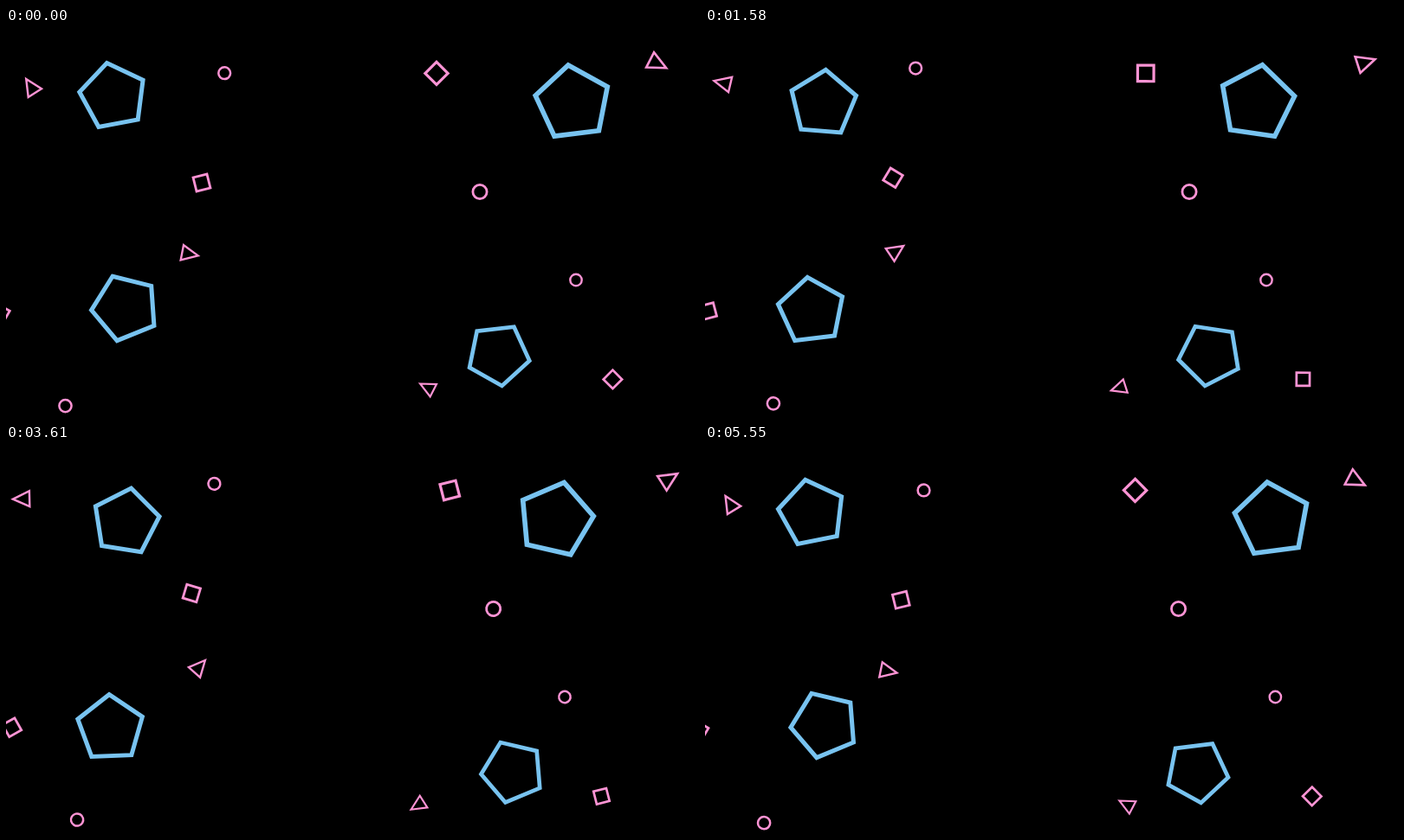
An HTML page that plays this animation: 800 by 450 pixels, repeating every 5.58 s.

```html
<!DOCTYPE html>
<html lang="en">
<head>
<meta charset="utf-8">
<title>Drifting shapes</title>
<style>
  html, body { margin: 0; width: 100%; height: 100%; overflow: hidden; background: #000; }
  svg { display: block; width: 100vw; height: 100vh; }
  svg * { fill: none; stroke-linejoin: miter; }
</style>
</head>
<body>
<svg id="stage" viewBox="0 0 800 450"></svg>
<script>
const LOOP = 5580;
const BLUE = '#78c3f0', PINK = '#ff94d5';
const stage = document.getElementById('stage');

// Smooth curve through a few values, tangents taken from local parabolas.
const KNOTS = [0, 1180, 2000, 2670, 3610, 4360, 5550];
function curve(values) {
  const last = KNOTS.length - 1;
  const gap = i => KNOTS[i + 1] - KNOTS[i];
  const slope = i => (values[i + 1] - values[i]) / gap(i);
  const tangent = KNOTS.map((_, i) => {
    if (i === 0) return slope(0) + (slope(0) - slope(1)) * gap(0) / (gap(0) + gap(1));
    if (i === last) {
      return slope(i - 1) + (slope(i - 1) - slope(i - 2)) * gap(i - 1) / (gap(i - 1) + gap(i - 2));
    }
    return (slope(i - 1) * gap(i) + slope(i) * gap(i - 1)) / (gap(i - 1) + gap(i));
  });
  return time => {
    const t = Math.min(time, KNOTS[last]);
    let i = 0;
    while (i < last - 1 && t > KNOTS[i + 1]) i++;
    const h = gap(i), u = (t - KNOTS[i]) / h, v = 1 - u;
    return v * v * ((1 + 2 * u) * values[i] + u * h * tangent[i])
         + u * u * ((1 + 2 * v) * values[i + 1] - v * h * tangent[i + 1]);
  };
}

const sway  = curve([0, .535, .835, 1, .9, .493, -.025]);
const glide = curve([0, .537, .837, 1, .803, .41, -.015]);
const spin  = curve([0, .48, .773, 1, .83, .424, -.005]);

const shapes = [];
function add(tag, attrs, color, width, from, to, angle, turn, move, rotate) {
  const node = document.createElementNS('http://www.w3.org/2000/svg', tag);
  for (const key in attrs) node.setAttribute(key, attrs[key]);
  node.setAttribute('stroke', color);
  node.setAttribute('stroke-width', width);
  stage.append(node);
  shapes.push({ node, from, to, angle, turn, move, rotate });
}

function pentagon(from, to, radius, angle) {
  const points = Array.from({ length: 5 }, (_, i) => {
    const a = i * Math.PI * 2 / 5;
    return [radius * Math.sin(a), -radius * Math.cos(a)].map(n => n.toFixed(2)).join();
  }).join(' ');
  add('polygon', { points }, BLUE, radius * .128, from, to, angle, 22, glide, sway);
}

function pink(tag, attrs, width, from, to, angle) {
  add(tag, attrs, PINK, width, from, to, angle, -71.5, sway, spin);
}
const circle = (from, to, r, width) => pink('circle', { r }, width, from, to, 0);
const square = (from, to, side, width, angle) =>
  pink('rect', { x: -side / 2, y: -side / 2, width: side, height: side }, width, from, to, angle);
const triangle = (from, to, k, angle) =>
  pink('polygon', { points: `${12.7 * k},0 ${-6.4 * k},${9 * k} ${-6.4 * k},${-9 * k}` },
    2.4 * k, from, to, angle);

pentagon([123.7, 79], [141.9, 91.2], 39.2, -10.7);
pentagon([654.4, 86.6], [629.6, 86.2], 44, -7);
pentagon([137.7, 323.6], [116.4, 328.9], 39.2, -22);
pentagon([568.4, 377.6], [589, 377.9], 36.6, 29.5);

circle([252.2, 52.2], [239.1, 44], 6.9, 2.5);
circle([547, 189.5], [564.4, 189.5], 8.1, 2.8);
circle([658, 291.5], [643.5, 291.5], 6.7, 2.4);
circle([68.5, 437.1], [83.6, 433.1], 7.1, 2.5);

square([497, 52.4], [514, 52.4], 18.6, 3.2, 45);
square([226, 179], [213, 170.7], 16.4, 2.8, -14);
square([-6.6, 330.2], [8.4, 326.4], 16, 2.8, 30);
square([700.4, 406.4], [686, 406.3], 15.2, 2.7, 45);

triangle([30, 69.7], [19.7, 61.5], 1, 238);
triangle([749.8, 40], [764.8, 40.7], 1.09, 27);
triangle([209.5, 261], [223, 258], .98, 11);
triangle([488.2, 416.7], [476, 415.5], .9, 207);

function draw(time) {
  for (const { node, from, to, angle, turn, move, rotate } of shapes) {
    const p = move(time);
    const [x, y] = from.map((start, i) => (start + (to[i] - start) * p).toFixed(2));
    const degrees = (angle + turn * rotate(time)).toFixed(2);
    node.setAttribute('transform', `translate(${x} ${y}) rotate(${degrees})`);
  }
}

const start = performance.now();
function tick() {
  draw((performance.now() - start) % LOOP);
  requestAnimationFrame(tick);
}
tick();
</script>
</body>
</html>
```
